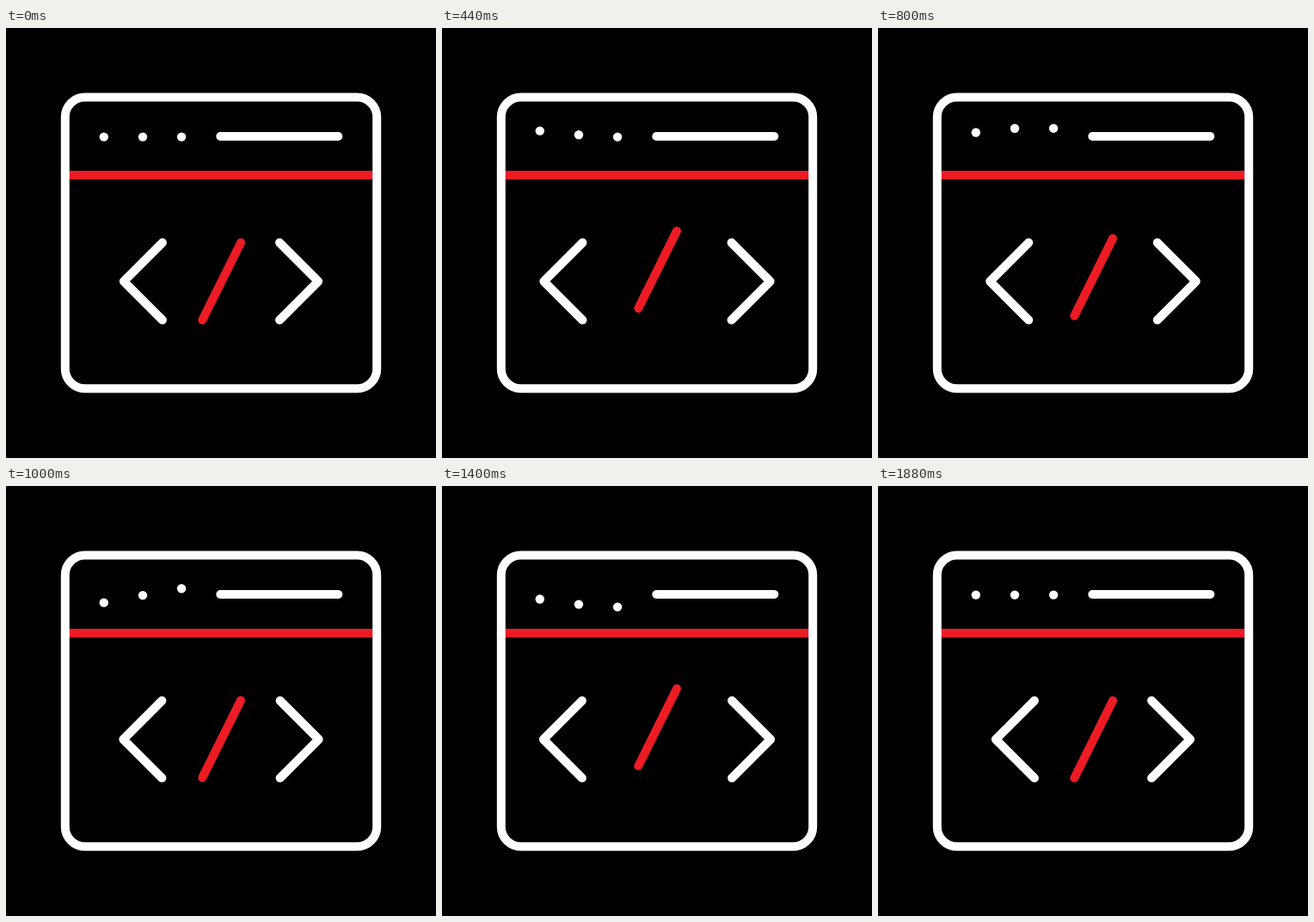
Animation, 500 px wide and 500 px high, one loop 1920 ms. Source, as an HTML page:

```html
<!DOCTYPE html>
<html lang="en">
<head>
<meta charset="utf-8">
<title>Code window</title>
<style>
  html, body { margin: 0; width: 100%; height: 100%; overflow: hidden; background: #000; }
  svg { display: block; width: 100%; height: 100%; }
  .line { fill: none; stroke: #fff; stroke-width: 10; stroke-linecap: round; stroke-linejoin: round; }
  .red { stroke: #ed1c24; }
  .dot { fill: #fff; }
</style>
</head>
<body>
<svg viewBox="0 0 500 500">
  <path class="line red" d="M68.8 171H431.2"/>
  <rect class="line" x="68.8" y="80.6" width="362.4" height="338.6" rx="23"/>
  <path class="line" d="M249.3 126H386.3"/>
  <circle class="dot" cx="113.8" cy="126.6" r="5.2"/>
  <circle class="dot" cx="159" cy="126.6" r="5.2"/>
  <circle class="dot" cx="204.1" cy="126.6" r="5.2"/>
  <path id="left" class="line" d="M181.9 249.6L136.9 294.6L181.9 339.6"/>
  <path id="slash" class="line red" d="M273 249.6L228.3 339.6"/>
  <path id="right" class="line" d="M318.1 249.6L363.1 294.6L318.1 339.6"/>
</svg>
<script>
const LOOP = 1920, STEP = 40, STAGGER = 120;
const SPREAD = 19, LIFT = 14;
const left = document.getElementById('left');
const right = document.getElementById('right');
const slash = document.getElementById('slash');
const dots = document.querySelectorAll('.dot');

// Keys are [time, value] pairs, eased in and out between neighbours.
const openKeys = [[80, 0], [480, 1], [560, 1], [960, 0], [1360, 1], [1400, 1], [1800, 0]];
const bounceKeys = [[200, 0], [580, -10], [660, -10], [1140, 14], [1160, 14], [1560, 0]];

function sample(keys, t) {
  const next = keys.findIndex(([time]) => time > t);
  if (next === 0) return keys[0][1];
  if (next < 0) return keys[keys.length - 1][1];
  const [t0, a] = keys[next - 1], [t1, b] = keys[next];
  const u = (t - t0) / (t1 - t0);
  return a + (b - a) * u * u * (3 - 2 * u);
}

function move(el, x, y) {
  el.setAttribute('transform', `translate(${x} ${y})`);
}

function draw(t) {
  const open = sample(openKeys, t);
  move(left, -SPREAD * open, 0);
  move(right, SPREAD * open, 0);
  move(slash, 0, -LIFT * open);
  dots.forEach((dot, i) => move(dot, 0, sample(bounceKeys, t - i * STAGGER)));
}

const start = performance.now();
function tick() {
  const t = (performance.now() - start) % LOOP;
  draw(Math.floor(t / STEP) * STEP);
  requestAnimationFrame(tick);
}
draw(0);
requestAnimationFrame(tick);
</script>
</body>
</html>
```
